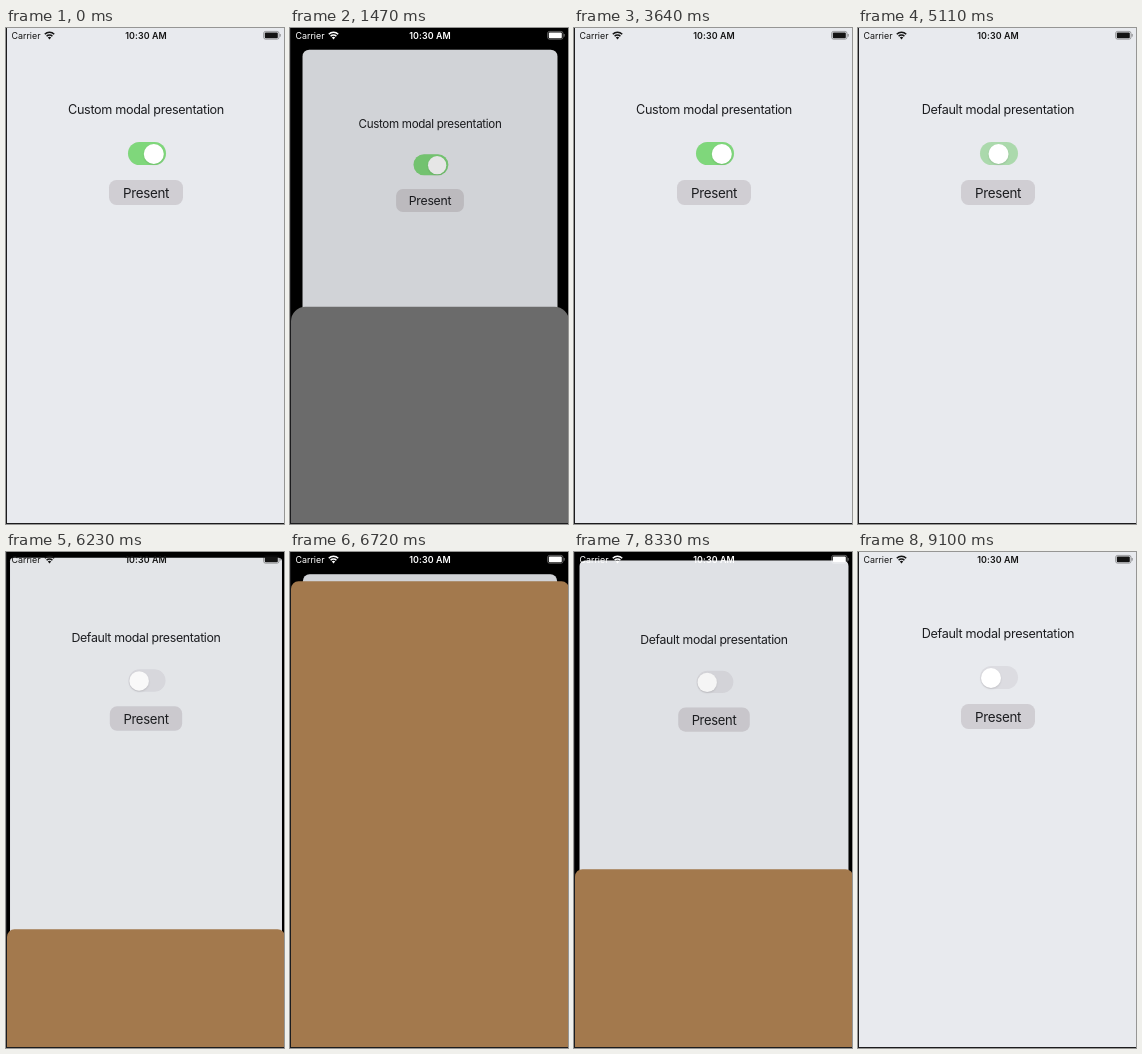
These frames come from a looping animation (278x496 px, 9450 ms). An HTML page:

```html
<!DOCTYPE html>
<html lang="en">
<head>
<meta charset="utf-8">
<title>Modal presentation</title>
<style>
  html, body { margin: 0; width: 100%; height: 100%; overflow: hidden; background: #000; }
  body { font-family: Inter, Roboto, sans-serif; color: #1c1d20; }
  #stage { position: absolute; left: 0; top: 0; width: 278px; height: 496px; overflow: hidden; background: #000; }
  #stage div, #stage span, #stage svg { position: absolute; }

  #card { left: 1px; top: 0; width: 278px; height: 496px; background: #e8eaee; overflow: hidden; transform-origin: 50% 0; }
  #label { left: 0; width: 100%; top: 72px; line-height: 20px; text-align: center; font-size: 12.64px; letter-spacing: -.33px; white-space: nowrap; }
  #switch { left: 120.6px; top: 114px; width: 38px; height: 23px; border-radius: 12px; background: #dcdce1; }
  #on { inset: 0; border-radius: 12px; background: #7fd77b; }
  #thumb { left: 1.6px; top: 1.5px; width: 20px; height: 20px; border-radius: 50%; background: #fff; box-shadow: 0 1px 2px rgba(0, 0, 0, .12); }
  #button { left: 102px; top: 152px; width: 74px; height: 25px; border-radius: 7.5px; background: #d0ced3; line-height: 26.4px; text-align: center; font-size: 13.4px; letter-spacing: -.3px; }
  #dim { inset: 0; background: #000; }

  #status { left: 0; top: 0; width: 278px; height: 15px; font-size: 8.9px; line-height: 15px; white-space: nowrap; }
  #carrier { left: 5.5px; }
  #clock { left: 90px; width: 100px; text-align: center; font-weight: 600; letter-spacing: .1px; }
  #sheet { left: 1px; top: 0; width: 278px; height: 520px; }
  #left { left: 0; top: 0; width: 1px; height: 496px; background: #1c1c1e; }
  #bottom { left: 0; top: 495px; width: 278px; height: 1px; background: #1c1c1e; }
</style>
</head>
<body>
<div id="stage">
  <div id="card">
    <div id="label"></div>
    <div id="switch"><div id="on"></div><div id="thumb"></div></div>
    <div id="button">Present</div>
    <div id="dim"></div>
  </div>
  <div id="status">
    <span id="carrier">Carrier</span>
    <span id="clock">10:30 AM</span>
    <svg width="278" height="15" fill="none" stroke="currentColor" style="left:0;top:0">
      <path d="M38.8 6.2a6.6 6.6 0 0 1 9.4 0M40.6 8.2a4.1 4.1 0 0 1 5.8 0" stroke-width="1.6"/>
      <path d="M43.5 11.4l-1.7-1.8a2.4 2.4 0 0 1 3.4 0z" fill="currentColor" stroke="none"/>
      <rect x="257.6" y="3.4" width="15.4" height="7.8" rx="2" stroke-width=".8" opacity=".45"/>
      <rect x="258.8" y="4.4" width="13" height="5.8" rx="1" fill="currentColor" stroke="none"/>
      <path d="M274.2 6v2.6" stroke-width="1" opacity=".45"/>
    </svg>
  </div>
  <div id="sheet"></div>
  <div id="left"></div>
  <div id="bottom"></div>
</div>
<script>
  const LOOP = 9450, STEP = 70, HEIGHT = 496;
  const SHRINK = 32 / 375, CARD_TOP = 22.2;
  const $ = id => document.getElementById(id);
  const parts = {};
  for (const id of ['card', 'label', 'on', 'thumb', 'dim', 'status', 'sheet']) parts[id] = $(id);

  // drag: [time, distance] points; the last one is the release
  const custom = {
    start: 1030, speed: 12.6, height: 223, radius: 14.5, color: '#6b6b6b',
    drag: [[2350, 0], [2730, 84], [3120, 135]], reach: 475, release: 16, light: [1120, 3260]
  };
  const standard = {
    start: 6176.7, speed: 18.26, height: 467, radius: 7.5, color: '#a3794d',
    drag: [[7680, 0], [7910, 157], [8400, 310]], reach: 467, release: 17, light: [6260, 8480]
  };

  const clamp = x => Math.min(1, Math.max(0, x));
  const ramp = (t, from, length) => clamp((t - from) / length);
  const mix = (a, b, k) => a + (b - a) * k;

  // critically damped spring from 0 to 1
  function spring(ms, speed) {
    const x = Math.max(0, ms) / 1000 * speed;
    return 1 - (1 + x) * Math.exp(-x);
  }

  function dragged(points, t) {
    let d = 0;
    for (let i = 1; i < points.length; i++) {
      const [t0, d0] = points[i - 1], [t1, d1] = points[i];
      d += (d1 - d0) * ramp(t, t0, t1 - t0);
    }
    return d;
  }

  // visible sheet height and how far the card is pushed back
  function pose(m, t) {
    const shown = spring(t - m.start, m.speed);
    const move = dragged(m.drag, t);
    const end = m.drag[m.drag.length - 1][0];
    const stay = 1 - spring(t - end, m.release);
    return {
      height: (m.height * shown - move) * stay,
      push: (shown - move / m.reach) * stay
    };
  }

  function draw(t) {
    const m = t < 5000 ? custom : standard;
    const { height, push } = pose(m, t);
    const { card, label, on, thumb, dim, status, sheet } = parts;

    const flat = push < .01;
    card.style.transform = flat ? 'none' : `translateY(${CARD_TOP * push}px) scale(${1 - SHRINK * push})`;
    card.style.borderRadius = flat ? 0 : 7.4 * clamp(push * 2) + 'px';
    dim.style.opacity = flat ? 0 : .1 * push;

    sheet.style.transform = `translateY(${height < 1 ? HEIGHT + 20 : HEIGHT - height}px)`;
    sheet.style.borderRadius = `${m.radius}px ${m.radius}px 0 0`;
    sheet.style.background = m.color;

    const light = ramp(t, m.light[0], 180) - ramp(t, m.light[1], 180);
    const tone = Math.round(mix(20, 255, light));
    status.style.color = `rgb(${tone}, ${tone}, ${tone})`;

    const off = spring(t - 5000, 15);
    on.style.opacity = 1 - off;
    thumb.style.transform = `translateX(${14.8 * (1 - off)}px)`;
    label.textContent = (t < 5040 ? 'Custom' : 'Default') + ' modal presentation';
  }

  const begin = performance.now();
  function tick() {
    const t = (performance.now() - begin) % LOOP;
    draw(Math.floor(t / STEP) * STEP);
    requestAnimationFrame(tick);
  }
  tick();
</script>
</body>
</html>
```
